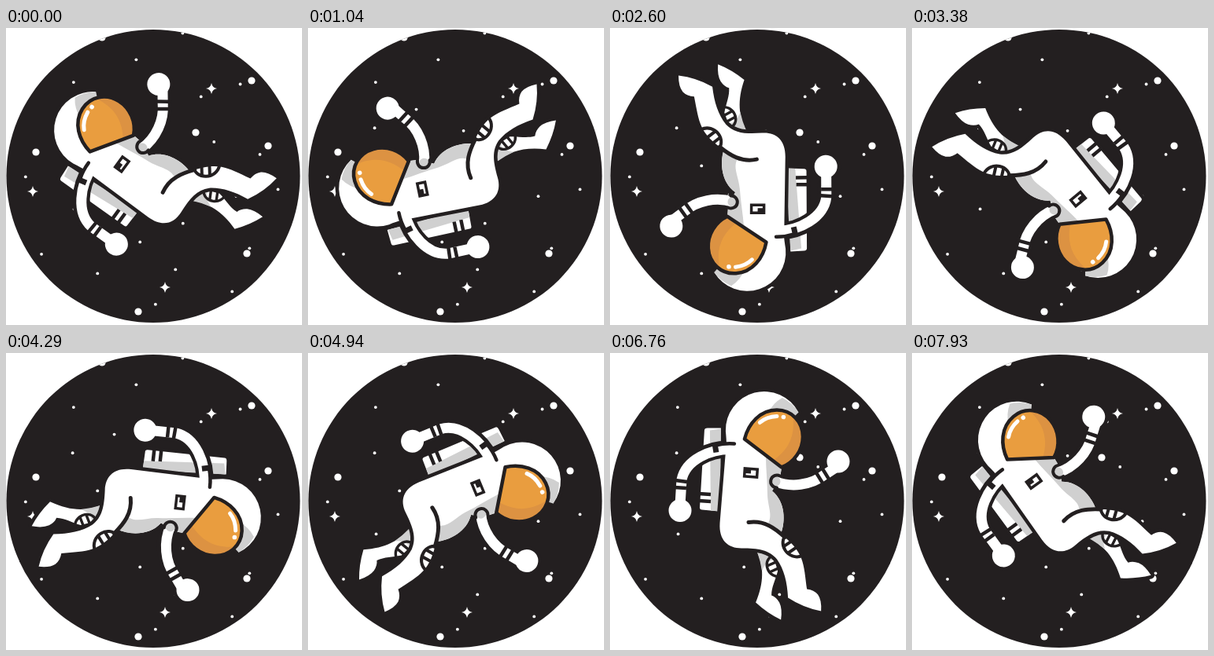
An HTML page that plays this animation: 376x378 px, repeating every 8000 ms.

```html
<!DOCTYPE html>
<html lang="en">
<head>
<meta charset="utf-8">
<title>Drifting astronaut</title>
<style>
  html, body { margin: 0; width: 100%; height: 100%; overflow: hidden; background: #fff; }
  svg { display: block; width: 376px; height: 378px; }
  .solid { fill: #fff; stroke: #231f20; stroke-width: 9; stroke-linejoin: round; paint-order: stroke; }
  .shade { fill: #d0d0d0; }
  .line { fill: none; stroke: #231f20; stroke-width: 4.5; stroke-linecap: round; stroke-linejoin: round; }
  .bar { fill: none; stroke: #231f20; stroke-width: 4.5; }
  .edge { fill: none; stroke: #231f20; stroke-width: 22; }
  .limb { fill: none; stroke: #fff; stroke-width: 13; }
</style>
</head>
<body>
<svg viewBox="0 0 376 378">
  <defs>
    <clipPath id="disc"><circle cx="187" cy="188.5" r="186.5"/></clipPath>
    <path id="visor" d="M171 108L218 144C234 138 245 122 245 105C245 86 231 71 212 71C191 71 176 88 171 108Z"/>
    <clipPath id="glass"><use href="#visor"/></clipPath>
    <path id="sparkle" d="M0 -7Q1 -1 7 0Q1 1 0 7Q-1 1 -7 0Q-1 -1 0 -7"/>
    <g id="knee">
      <path class="line" d="M-17 -1C-15 18 13 18 17 -1" style="stroke-width:4"/>
      <path class="bar" d="M-6 -2V12M4 -2V12" style="stroke-width:4"/>
    </g>
  </defs>
  <g clip-path="url(#disc)">
    <rect width="376" height="378" fill="#231f20"/>
    <g id="dust" fill="#fff"></g>
    <g fill="#fff">
      <circle cx="122" cy="12" r="4.6"/>
      <circle cx="312" cy="67" r="4.6"/>
      <circle cx="241" cy="133" r="4.6"/>
      <circle cx="333" cy="150" r="4.6"/>
      <circle cx="38" cy="158" r="4.6"/>
      <circle cx="306" cy="287" r="4.6"/>
      <circle cx="168" cy="361" r="4.6"/>
      <use href="#sparkle" x="261" y="77"/>
      <use href="#sparkle" x="34" y="208"/>
      <use href="#sparkle" x="202" y="330"/>
    </g>
    <g id="figure">
      <!-- backpack -->
      <path class="solid" d="M124 94H141L138 200L117 198Q114 198 114 195L120 97Q120 94 124 94Z"/>
      <path class="shade" d="M127 97L141 95L140 200L128 199Z"/>
      <path class="bar" d="M113 177.5L128 178.5M113 186.5L128 187.5"/>
      <!-- far leg -->
      <path class="solid" d="M187 252C195 270 196 290 185 316Q200 330 217 338Q219 324 215 316Q211 309 205 307C205 296 210 288 213 276L206 252Z"/>
      <path class="shade" d="M187 252L206 252L208 262Q198 262 193 276Q191 263 187 252Z"/>
      <use href="#knee" transform="translate(211 270) rotate(66) scale(.85)"/>
      <!-- body, helmet and near leg -->
      <path class="edge" d="M152 121C128 120 96 134 91 160L90 180"/>
      <path class="solid" d="M239.500 74A49 49 0 0 0 147 98Q148 108 148 114L147 124L139.500 215C138 237 150 247 167 247C188 247 202 249 212 261C221 274 225 290 226 310Q246 323 268 327Q269 313 264 306Q259 300 250 299C248 284 247 270 243 260C239 249 230 239 217 229C223 213 223 188 206 174L216 158L218 144L228 82Z"/>
      <path class="shade" d="M239.500 74A49 49 0 0 0 219 55.500Q207 62 200 76L230 84Z"/>
      <path class="shade" d="M198 129C198 145 200 162 200 178C200 192 207 205 201 215Q209 219 217 228C223 213 223 188 206 174L216 158L218 144Z"/>
      <path class="line" d="M176 214C196 211 210 222 222 233" style="stroke-width:5"/>
      <use href="#knee" transform="translate(234 243) rotate(56)"/>
      <!-- visor -->
      <g clip-path="url(#glass)">
        <rect x="165" y="65" width="84" height="85" fill="#e99d3f"/>
        <path d="M230 66C238 99 230 120 206 136L220 150H250V66Z" fill="#dc9242"/>
      </g>
      <use href="#visor" class="line"/>
      <path d="M190.500 87Q199 79.500 212 79" fill="none" stroke="#fff" stroke-width="5" stroke-linecap="round"/>
      <circle cx="220.500" cy="80" r="2.800" fill="#fff"/>
      <!-- chest patch -->
      <g transform="translate(179 151) rotate(4)">
        <rect class="bar" x="-8" y="-5" width="16" height="10" style="stroke-width:3.5"/>
        <rect x="-7" y="-5" width="7" height="6" fill="#231f20"/>
      </g>
      <!-- near arm -->
      <circle class="solid" cx="89" cy="199" r="14.500"/>
      <path class="limb" d="M156 121C128 120 96 134 91 160L89 192"/>
      <path class="bar" d="M83 160.500L98 162.500M82 169.500L97 170.500"/>
      <path class="line" d="M158 114Q146 113 134 116"/>
      <path class="bar" d="M133 113L135 125" style="stroke-width:7"/>
      <!-- far arm -->
      <path class="edge" d="M218 165C232 170 255 167 272 154L278 150"/>
      <circle class="solid" cx="290" cy="136.500" r="14.500"/>
      <path class="limb" d="M210 162C230 170 255 167 272 154L286 145"/>
      <path class="bar" d="M262 151L270 164M270 146L278 159"/>
      <circle class="shade" cx="210" cy="162" r="6.500"/>
      <path class="line" d="M216 155A8 8 0 1 0 212 170" style="stroke-width:4"/>
    </g>
  </g>
</svg>
<script>
// Small stars: a golden-angle spiral, loosened by a seeded jitter.
let seed = 7;
const jitter = size => ((seed = seed * 16807 % 2147483647) / 2147483647 - 0.5) * size;
const count = 25;
let dust = '';
for (let i = 0; i < count; i++) {
  const r = 184 * Math.sqrt((i + 0.5) / count), a = i * 2.4;
  const x = 187 + r * Math.cos(a) + jitter(24), y = 188 + r * Math.sin(a) + jitter(24);
  dust += `<circle cx="${x}" cy="${y}" r="1.9"/>`;
}
document.getElementById('dust').innerHTML = dust;

const frame = 0.13, end = 7.93;

// Steady turn in degrees, with a lead that swells and fades over the loop.
const angleAt = t => 302 - 43.1 * t - (t * (end - t)) ** 2 * (0.0545 + 0.00255 * t * t);

const figure = document.getElementById('figure');
function draw() {
  const t = Math.floor(performance.now() % 8000 / 1000 / frame) * frame;
  figure.setAttribute('transform', `translate(0 1.5) rotate(${angleAt(t)} 182 190)`);
  requestAnimationFrame(draw);
}
draw();
</script>
</body>
</html>
```
